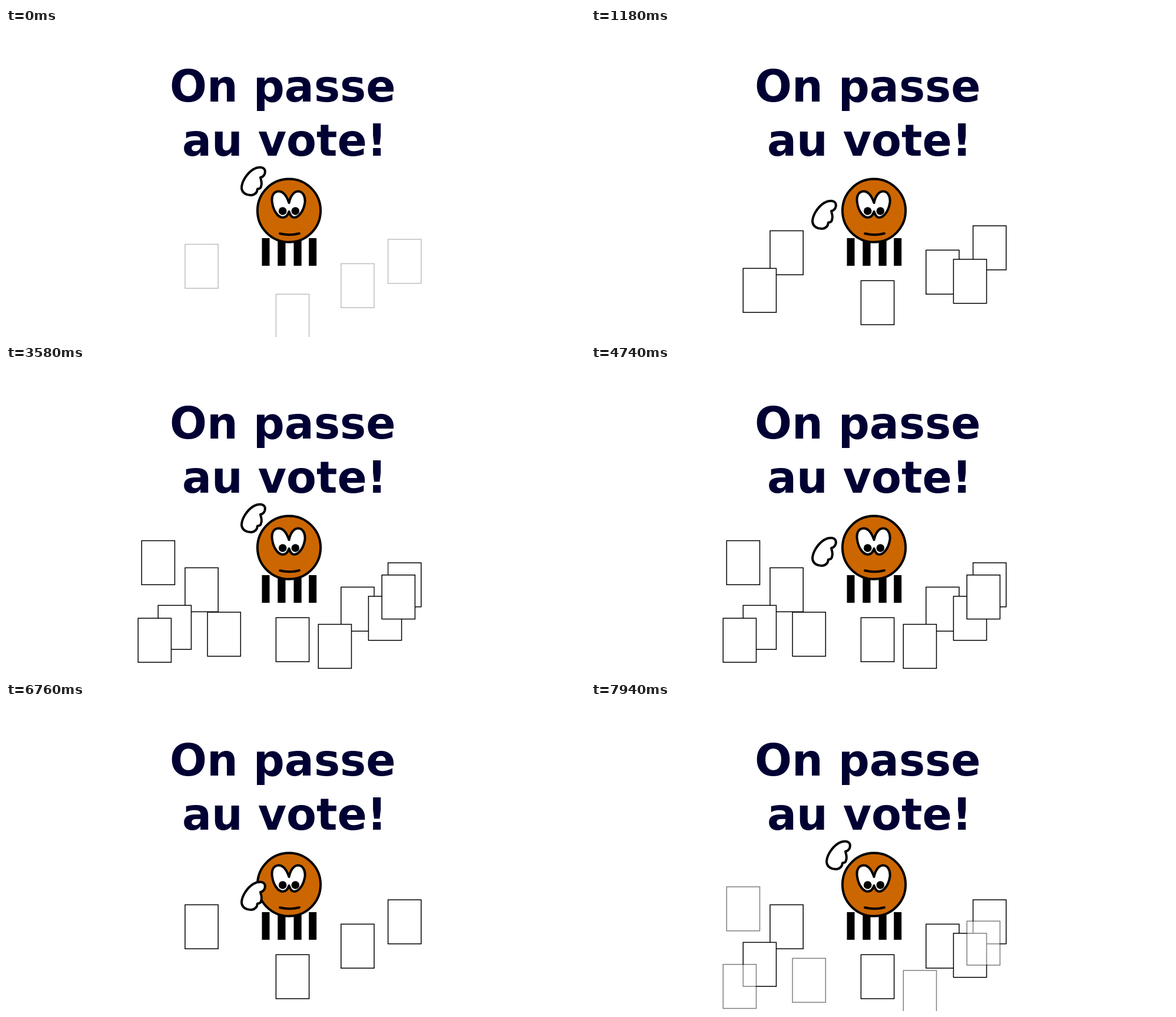
An HTML page that plays this animation: 983x525 px, repeating every 8 s.

```html
<!DOCTYPE html>
<html lang="fr">
<head>
<meta charset="utf-8">
<title>On passe au vote!</title>
<style>
  html, body { margin: 0; width: 100%; height: 100%; overflow: hidden; background: #fff; }
  svg { display: block; width: 983px; height: 525px; }
  text { font: bold 74.2px "DejaVu Sans", sans-serif; fill: #000033; }
  .card { fill: #fff; stroke: #000; stroke-width: 1.5; }
  .ink { stroke: #000; stroke-width: 4; stroke-linecap: round; stroke-linejoin: round; }
</style>
</head>
<body>
<svg viewBox="0 0 983 525">
  <text x="278" y="125">On passe</text>
  <text x="299" y="216.5">au vote!</text>
  <g id="cards"></g>
  <path d="M434.5 357h13v47h-13zM461.3 357h13.2v47h-13.2zM488.5 357h13.2v47h-13.2zM514.2 357h13v47h-13z"/>
  <circle class="ink" cx="480.5" cy="310.2" r="53.6" fill="#cc6600"/>
  <path class="ink" fill="#fff" d="M480.5 297C476 284 470 277.5 463 277.5C454 277.5 450 286 452 297C454 311 462 322 470 322C475 322 478.500 318 480.500 312C482.500 318 485 322 489 322C498 322 506 309 507.500 296C508.500 285 503 277.500 496 277.500C489 277.500 483 285 480.500 297Z"/>
  <circle cx="469.7" cy="311" r="6.8"/>
  <circle cx="491.3" cy="311" r="6.8"/>
  <path class="ink" fill="none" d="M465 349.300Q482 353.500 498 349"/>
  <path class="ink" id="hand" fill="#fff" d="M432 254C437 253 441 248 439.500 241.500C437 235.500 428 235.500 420 240C409 247 400 261 400 272C401 281 409 284.500 417 284C424 283 426.500 278 427 273.500C431 273 433 271.500 433 269C435.500 263 432.500 258 432 254Z"/>
</svg>
<script>
const LOOP = 8000;
const UP = [0, 0], OUT = [-24, 57], DOWN = [0, 69];
const RISE = [[0.25, 23], [0.5, 15.5], [0.75, 7.7], [1, 0]];

// Each group: cards as [x, y], start times of the rising steps, time it is cleared
const groups = [
  { cards: [[304, 344.5], [458.4, 429.3], [568.8, 377.4], [648.6, 336.1]],
    runs: [[0, 170, 400, 550]], clear: LOOP },
  { cards: [[258.3, 408.4], [615.4, 393]],
    runs: [[550, 780, 1010, 1180], [6930, 7160, 7310, 7540]], clear: 6150 },
  { cards: [[230.3, 298.5], [224.3, 430.3], [342.1, 420], [530.3, 440.6], [638.2, 356.8]],
    runs: [[1410, 1560, 1790, 1960], [7770, 7940]], clear: 6150 }
];

const handSteps = [
  [0, UP], [550, OUT], [1560, UP], [2570, DOWN], [3580, UP],
  [4740, OUT], [5750, UP], [6760, DOWN], [7770, UP]
];

const NS = "http://www.w3.org/2000/svg";
const layer = document.getElementById("cards");
const hand = document.getElementById("hand");

for (const group of groups) {
  group.nodes = group.cards.map(([x, y]) => {
    const rect = document.createElementNS(NS, "rect");
    const box = { class: "card", x, y, width: 56.2, height: 74.8 };
    for (const key in box) rect.setAttribute(key, box[key]);
    return layer.appendChild(rect);
  });
}

function pose(group, t) {
  const run = group.runs.filter(r => r[0] <= t).pop();
  if (!run || (run[0] < group.clear && t >= group.clear)) return [0, 0];
  return RISE[run.filter(s => s <= t).length - 1];
}

function draw(t) {
  for (const group of groups) {
    const [alpha, dy] = pose(group, t);
    for (const node of group.nodes) {
      node.setAttribute("opacity", alpha);
      node.setAttribute("transform", `translate(0 ${dy})`);
    }
  }
  const [, [x, y]] = handSteps.filter(s => s[0] <= t).pop();
  hand.setAttribute("transform", `translate(${x} ${y})`);
}

const start = performance.now();
function tick() {
  draw((performance.now() - start) % LOOP);
  requestAnimationFrame(tick);
}
tick();
</script>
</body>
</html>
```
